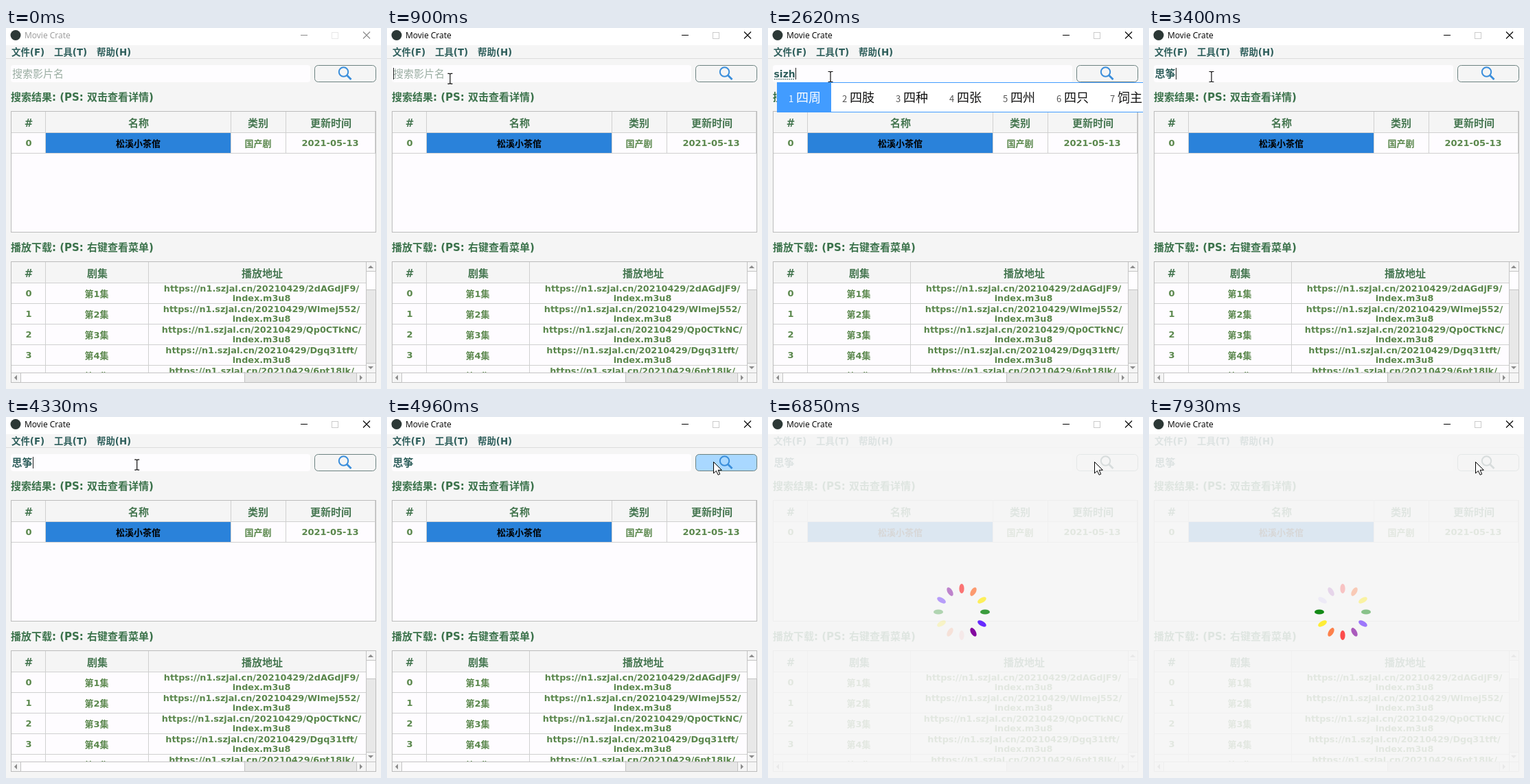
Recreate the animation shown at these times as an HTML page. Size 546 by 526 pixels, loop 8000 ms.

```html
<!DOCTYPE html>
<html lang="zh">
<head>
<meta charset="utf-8">
<title>Movie Crate</title>
<style>
html, body { margin: 0; width: 100%; height: 100%; overflow: hidden; background: #f5f5f5; }
svg { display: block; width: 546px; height: 526px; }
text { font: 700 13px "DejaVu Sans", "Noto Sans CJK SC", "Noto Sans CJK", sans-serif; white-space: pre; }
.mid { text-anchor: middle; }
.menu { font-size: 13.4px; fill: #2f5f5c; }
.label { font-size: 15px; fill: #3b724b; }
.head { font-size: 15px; fill: #457650; }
.cell { fill: #5a874c; }
.url { font-size: 12.8px; }
.title { font: 400 12px "Open Sans", "Noto Sans", sans-serif; }
.input { font-size: 15px; fill: #2f5f5c; }
.input.raw { font-size: 14px; }
.input.hint { font-weight: 500; fill: #9aada2; }
.ime { font: 400 18px "Noto Sans CJK SC", "Noto Sans CJK", sans-serif; }
.ime.key { font-size: 13px; }
</style>
</head>
<body>
<svg id="stage" viewBox="0 0 546 526">
  <defs><clipPath id="rows"><rect x="8" y="341" width="516" height="161"/></clipPath></defs>
  <g id="window"></g>
  <g id="field"></g>
  <g id="bar"></g>
  <g id="veil" display="none"><rect y="25" width="546" height="501" fill="#f5f5f5" opacity=".88"/></g>
  <path id="arrow" d="M0 0V16.5L3.9 12.9 6.6 18.8 9.2 17.7 6.6 11.8H11.8Z" fill="#fff" stroke="#000"/>
  <path id="beam" d="M-3.5 -7.5H-1L0 -6.5 1 -7.5H3.5M0 -6.5V6.5M-3.5 7.5H-1L0 6.5 1 7.5H3.5" fill="none" stroke="#111" stroke-width="1.2"/>
</svg>
<script>
const LOOP = 8000;
const $ = id => document.getElementById(id);

const rect = (x, y, w, h, fill, extra = '') =>
  `<rect x="${x}" y="${y}" width="${w}" height="${h}" fill="${fill}" ${extra}/>`;
const text = (x, y, s, cls, extra = '') =>
  `<text x="${x}" y="${y}" class="${cls}" ${extra}>${s}</text>`;
const path = (d, stroke, extra = '') =>
  `<path d="${d}" stroke="${stroke}" fill="none" ${extra}/>`;
const hline = (x, y, w, c = '#d0d0d0') => rect(x, y, w, 1, c);
const vline = (x, y, h, c = '#d0d0d0') => rect(x, y, 1, h, c);
const frame = (x, y, w, h, fill, c = '#bcbcbc', r = 0) =>
  rect(x + .5, y + .5, w - 1, h - 1, fill, `stroke="${c}" rx="${r}"`);
const tri = (x, y, turn) =>
  `<path d="M-4 2L0 -2 4 2Z" fill="#8c8c8c" transform="translate(${x} ${y}) rotate(${turn})"/>`;

function titleBar() {
  return rect(0, 0, 546, 25, '#fff') +
    '<circle cx="14" cy="10.5" r="7.5" fill="#2c3836"/>' +
    text(27, 15, 'Movie Crate', 'title', 'id="caption"') +
    `<g id="controls">${path('M429 10.5H439M520 5.5L530 15.5M530 5.5L520 15.5', 'currentColor', 'stroke-width="1.1"')}` +
    `<g opacity=".2">${frame(474, 6, 10, 10, 'none', 'currentColor')}</g></g>`;
}

function toolBar() {
  return text(8, 40, '文件(F)', 'menu') + text(70, 40, '工具(T)', 'menu') +
    text(132, 40, '帮助(H)', 'menu') + hline(0, 44, 546, '#dcdcdc') +
    rect(7, 54, 436, 25, '#fefdff', 'rx="4"') +
    `<rect id="button" x="449.5" y="54.5" width="89" height="24" rx="5" stroke="#6c8280"/>` +
    `<g id="lens" fill="none"><circle cx="491.5" cy="64" r="6.7" stroke-width="2"/>` +
    `<path d="M496.5 69L502.5 75" stroke-width="2.8"/></g>`;
}

function resultTable() {
  return text(7, 106, '搜索结果: (PS: 双击查看详情)', 'label') +
    frame(7, 121, 532, 177, '#fefcff') +
    rect(8, 122, 530, 31, '#f5f5f5') + rect(58, 153, 269, 29, '#2a82da') +
    hline(8, 152, 530) + hline(8, 182, 530) +
    [57, 327, 407, 537].map(x => vline(x, 122, 61)).join('') +
    [['#', 33], ['名称', 193], ['类别', 367], ['更新时间', 473]]
      .map(([s, x]) => text(x, 143.5, s, 'head mid')).join('') +
    text(33, 172, '0', 'cell mid') + text(192.5, 173, '松溪小茶倌', 'mid') +
    text(367, 173, '国产剧', 'cell mid') + text(472, 172, '2021-05-13', 'cell mid');
}

function playTable() {
  const files = ['2dAGdjF9', 'Wlmej552', 'Qp0CTkNC', 'Dgq31tft', '6pt18lk'];
  const rows = files.map((file, i) => {
    const y = 372 + i * 30;
    return text(33, y + 19, i, 'cell mid') + text(132, y + 20, `第${i + 1}集`, 'cell mid') +
      text(372, y + 12, `https://n1.szjal.cn/20210429/${file}/`, 'cell url mid') +
      text(372, y + 26, 'index.m3u8', 'cell url mid') + hline(8, y + 29, 516);
  }).join('');
  return text(7, 325, '播放下载: (PS: 右键查看菜单)', 'label') +
    frame(7, 340, 532, 177, '#fefcff') +
    `<g clip-path="url(#rows)">${rect(8, 341, 516, 31, '#f5f5f5')}${hline(8, 371, 516)}${rows}` +
    `${vline(57, 341, 161)}${vline(207, 341, 161)}</g>` +
    [['#', 33], ['剧集', 133], ['播放地址', 373]]
      .map(([s, x]) => text(x, 362.5, s, 'head mid')).join('') +
    scrollBars();
}

function scrollBars() {
  const c = '#c4c4c4';
  return rect(524, 341, 14, 161, '#e8e8e8') + rect(524, 341, 14, 14, '#f5f5f5') +
    rect(524, 488, 14, 14, '#f5f5f5') + frame(524, 354, 15, 28, '#fefdff', c) +
    vline(524, 341, 161, c) + hline(524, 488, 14, c) + tri(531, 348, 0) + tri(531, 495, 180) +
    rect(8, 503, 516, 13, '#e6e6e6') + rect(8, 503, 14, 13, '#f5f5f5') +
    rect(510, 503, 14, 13, '#f5f5f5') + rect(524, 502, 14, 14, '#f5f5f5') +
    frame(21, 502, 327, 15, '#fefdff', c) + hline(8, 502, 530, c) +
    vline(510, 502, 14, c) + vline(524, 502, 14, c) + tri(14, 509.5, -90) + tri(517, 509.5, 90);
}

$('window').innerHTML = titleBar() + toolBar() + resultTable() + playTable();

// Input method: time, field text, candidates
const typing = [
  [0, '', ''],
  [1650, 's', ''],
  [1740, 's', '是 说 上 三 时 使 所'],
  [1920, 'si', '四 思 死 斯 ④ Ⅳ 司'],
  [2390, 'siz', '四组 私自 四则 四字 四周 四座 四足'],
  [2550, 'sizh', '四周 四肢 四种 四张 四州 四只 饲主'],
  [2710, 'sizhe', '四折 思者 四者 四周 四肢 四种 四张'],
  [2860, 'sizhen', '四镇 四阵 四针 思真 四枕 四诊 私诊'],
  [3020, 'sizheng', '思筝 四正 四症 司正 私政 四郑 四争'],
  [3400, '思筝', '']
];
const caretOn = [[868, 1370], [1650, 3570], [4030, 4540]];

function candidates(words) {
  if (!words) return '';
  const list = words.split(' ');
  const pitch = list[0].length > 1 ? 78 : 60;
  const end = 14 + pitch * 7;
  const items = list.map((w, i) => {
    const x = 30 + pitch * i;
    return text(x, 108, i + 1, 'ime key', `fill="${i ? '#555' : '#fff'}"`) +
      text(x + 11, 108, w, 'ime', `fill="${i ? '#111' : '#fff'}"`);
  }).join('');
  const cx = end + 22.5;
  return frame(13, 79, end + 32, 44, '#fff', '#429cff') + rect(13, 79, pitch + 1, 44, '#429cff') +
    items + vline(end, 80, 42, '#429cff') +
    `<circle cx="${cx}" cy="101" r="8" fill="none" stroke="#111" stroke-width="1.3"/>` +
    `<circle cx="${cx - 3}" cy="99" r="1.2"/><circle cx="${cx + 3}" cy="99" r="1.2"/>` +
    path(`M${cx - 4} 103Q${cx} 108 ${cx + 4} 103`, '#111', 'stroke-width="1.2"');
}

let shown = '';
function drawField(t) {
  const [start, word, words] = typing.filter(s => t >= s[0]).pop();
  const caret = caretOn.some(([a, b]) => t >= a && t < b);
  const key = start + ' ' + caret;
  if (key === shown) return;
  shown = key;
  const raw = /[a-z]/.test(word);
  $('field').innerHTML = word
    ? text(8.5, 72, word, raw ? 'input raw' : 'input')
    : text(9, 72, '搜索影片名', 'input hint');
  const w = word ? $('field').firstChild.getComputedTextLength() : 0;
  let more = '';
  if (raw) more += path(`M9 74.5H${8 + w}`, '#2f5f5c', 'stroke-dasharray="2 1"');
  if (caret) more += vline(Math.round(8.5 + w), 58, 17, '#222');
  $('field').insertAdjacentHTML('beforeend', more);
  $('bar').innerHTML = candidates(words);
}

// Pointer
const span = (a, b, n) => Array.from({ length: n }, (_, i) => a + (b - a) * i / (n - 1));
const count = (list, t) => list.filter(v => t >= v).length;
const enter = span(140, 1050, 11);
const leave = span(4030, 4950, 10);
const mix = (a, b, p) => a + (b - a) * p;

function pointer(t) {
  if (t < 140) return null;
  if (t < 4030) {
    const p = 1 - (1 - count(enter, t) / 11) ** 3;
    return [mix(236, 91, p), mix(545, 71, p)];
  }
  const k = Math.min(1, count(leave, t) / 9);
  const p = k * k * (3 - 2 * k);
  return [mix(91, 475.5, p), mix(71, 65.5, p)];
}

function drawPointer(t) {
  const at = pointer(t);
  const inField = at && at[0] > 7 && at[0] < 443 && at[1] > 54 && at[1] < 79;
  const show = (id, on) => {
    $(id).setAttribute('display', on ? 'inline' : 'none');
    if (on) $(id).setAttribute('transform', `translate(${at})`);
  };
  show('beam', inField);
  show('arrow', at && !inField);
  return at && at[0] > 449 && at[1] < 79;
}

// Spinner
const hues = ['#ff0a0a', '#ff6420', '#ffec1c', '#0c860f', '#540fff', '#7f009c'];
const ticks = [5050, ...span(5200, 6140, 10), ...span(6310, 7240, 10), ...span(7390, 7930, 6)];
$('veil').insertAdjacentHTML('beforeend', Array.from({ length: 12 }, (_, i) =>
  `<ellipse class="petal" cx="282" cy="250" rx="3.6" ry="7" fill="${hues[i % 6]}" transform="rotate(${i * 30} 282 284)"/>`).join(''));
const petals = document.querySelectorAll('.petal');

function drawSpinner(t) {
  const head = (count(ticks, t) - 1) * .4 - 1;
  petals.forEach((p, i) => {
    const age = (head - i + 24) % 12;
    p.setAttribute('opacity', (1 - age / 12).toFixed(3));
  });
}

function draw(t) {
  const active = t >= 868;
  const busy = t >= 5050;
  $('caption').setAttribute('fill', active ? '#000' : '#999');
  $('controls').setAttribute('color', active ? '#000' : '#8a8a8a');
  drawField(t);
  const hover = drawPointer(t) && !busy;
  $('button').setAttribute('fill', hover ? '#a9d8ff' : '#f5f5f5');
  $('lens').setAttribute('stroke', busy ? '#002a2a' : '#3a8edb');
  $('veil').setAttribute('display', busy ? 'inline' : 'none');
  if (busy) drawSpinner(t);
}

const begin = performance.now();
function loop() {
  draw((performance.now() - begin) % LOOP);
  requestAnimationFrame(loop);
}
loop();
</script>
</body>
</html>
```
